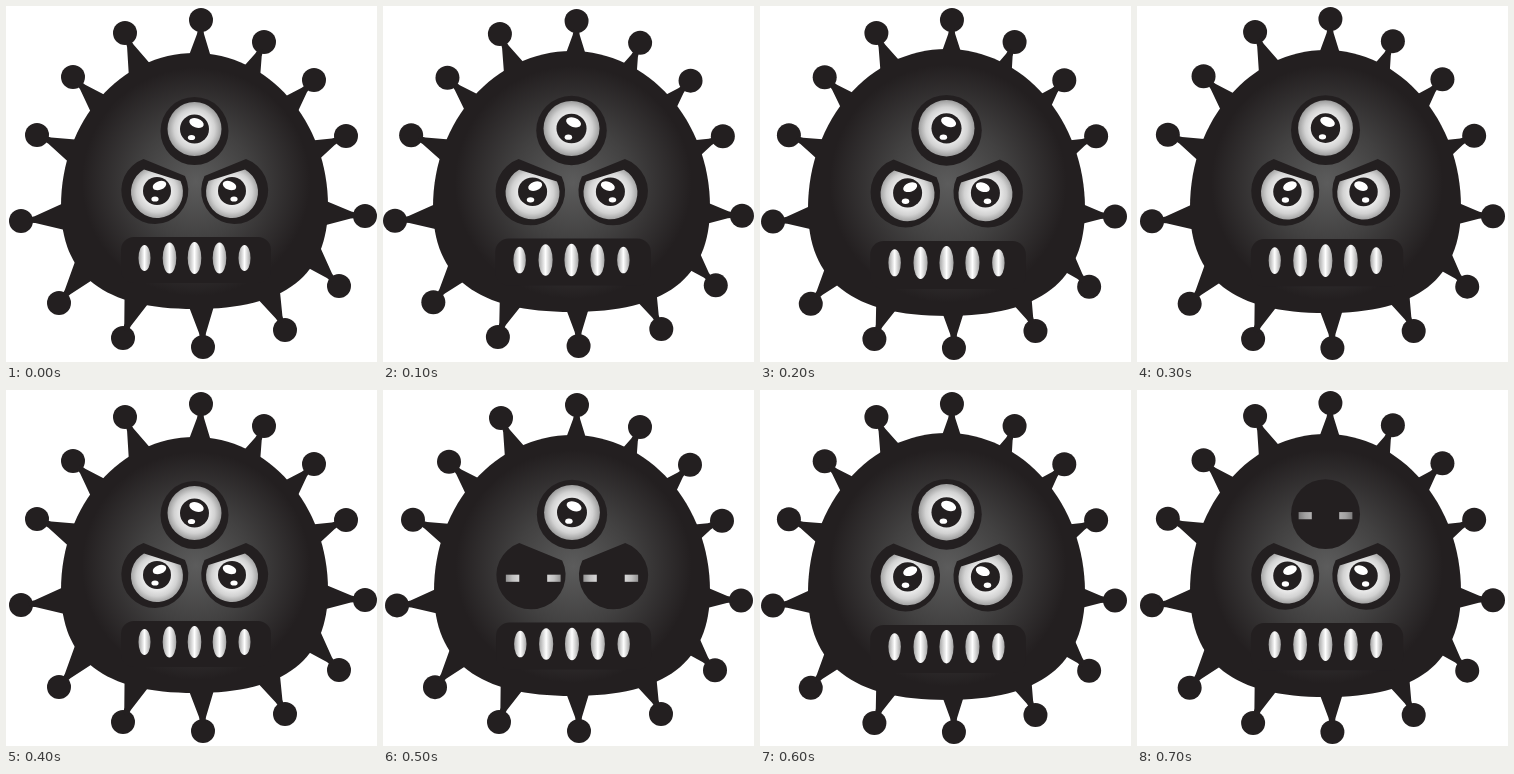
Write an HTML page that moves like this. It is 371x356 px and loops after 800 ms.

```html
<!DOCTYPE html>
<html lang="en">
<head>
<meta charset="utf-8">
<title>Pulsing virus</title>
<style>
  html, body { margin: 0; width: 100%; height: 100%; overflow: hidden; background: #fff; }
  svg { display: block; width: 100%; height: 100%; }
</style>
</head>
<body>
<svg viewBox="0 0 371 356" fill="#231f20">
  <defs>
    <radialGradient id="glow" gradientUnits="userSpaceOnUse" cx="190" cy="176" r="114">
      <stop offset="0" stop-color="#5c5c5c"/>
      <stop offset=".5" stop-color="#424141"/>
      <stop offset="1" stop-color="#231f20"/>
    </radialGradient>
    <radialGradient id="white" gradientUnits="userSpaceOnUse" cx="0" cy="0" r="27">
      <stop offset=".45" stop-color="#f0f0f0"/>
      <stop offset=".75" stop-color="#d2d2d2"/>
      <stop offset="1" stop-color="#9c9c9c"/>
    </radialGradient>
    <linearGradient id="enamel">
      <stop offset="0" stop-color="#a4a4a4"/>
      <stop offset=".5" stop-color="#fff"/>
      <stop offset="1" stop-color="#a4a4a4"/>
    </linearGradient>
    <path id="socket" d="M-12 -33A33.500 33.500 0 1 0 29.500 -16Z"/>
    <g id="eye">
      <path d="M-13 -22.500A26 26 0 1 0 23.500 -11Z" fill="url(#white)"/>
      <circle cy="-1" r="14"/>
      <g fill="#fff">
        <ellipse cx="2.500" cy="-6.500" rx="7" ry="4.300" transform="rotate(-20 2.500 -6.500)"/>
        <ellipse cx="-2" cy="7" rx="3.600" ry="2.600"/>
      </g>
    </g>
    <g id="slit" fill="url(#white)" opacity=".9">
      <rect x="-26.500" y="-2" width="13" height="7"/>
      <rect x="13.500" y="-2" width="13" height="7"/>
    </g>
  </defs>
  <g id="spikes"></g>
  <g id="body">
    <path fill="url(#glow)" d="M55 200C55 115 115 47 188.500 47S322 115 322 200C322 270 279 303 188.500 303S55 270 55 200Z"/>
    <rect x="115" y="231" width="150" height="46" rx="13"/>
    <g id="teeth" fill="url(#enamel)"></g>
    <g transform="translate(151 186)">
      <use href="#socket" x="-1.500"/>
      <use class="low open" href="#eye"/>
      <use class="low shut" href="#slit"/>
    </g>
    <g transform="translate(226 186) scale(-1 1)">
      <use href="#socket" x="-2"/>
      <use class="low open" href="#eye"/>
      <use class="low shut" href="#slit"/>
    </g>
    <g transform="translate(188.500 123)">
      <circle cy="2" r="34"/>
      <g class="top open">
        <circle r="27" fill="url(#white)"/>
        <circle r="14.500"/>
        <g fill="#fff">
          <ellipse cx="2" cy="-6" rx="7.500" ry="4.500" transform="rotate(20 2 -6)"/>
          <ellipse cx="-3" cy="8.500" rx="3.600" ry="2.600"/>
        </g>
      </g>
      <use class="top shut" href="#slit" y="2" opacity=".8"/>
    </g>
  </g>
</svg>
<script>
const $ = id => document.getElementById(id);
const knobs = [
  [195, 14], [258, 36], [308, 74], [340, 130], [359, 210], [333, 280], [279, 324],
  [197, 341], [117, 332], [53, 297], [15, 215], [31, 129], [67, 71], [119, 27]
];

// Left, right, top and bottom extents of the knob ring and of the body
const rest = { ring: [15, 359, 14, 341], body: [55, 322, 47, 303] };
const grow = { ring: [12, 359, 15, 340], body: [50, 327, 45, 306] };
const full = { ring: [13, 355, 14, 342], body: [48, 325, 43, 310] };
const sink = { ring: [15, 356, 13, 342], body: [53, 324, 44, 307] };
const ease = { ring: [14, 358, 15, 341], body: [51, 327, 45, 306] };
const poses = [rest, grow, full, sink, rest, ease, full, sink];

// Scale and offset that carry one box onto another
function fit([l, r, t, b], [L, R, T, B]) {
  const sx = (R - L) / (r - l), sy = (B - T) / (b - t);
  return { sx, sy, dx: L - l * sx, dy: T - t * sy };
}

// Spikes under the flat base lean closer to vertical
function spike(x, y) {
  const a = Math.atan2((y > 250 ? 125 : 198) - y, 189 - x), c = Math.cos(a), s = Math.sin(a);
  const at = (d, w) => (x + c * d - s * w).toFixed(1) + ',' + (y + s * d + c * w).toFixed(1);
  return `<circle cx="${x}" cy="${y}" r="12"/>
    <polygon points="${at(8, 2.5)} ${at(14, 3.5)} ${at(54, 17)} ${at(54, -17)} ${at(14, -3.5)} ${at(8, -2.5)}"/>`;
}

function show(cls, shut) {
  document.querySelectorAll('.' + cls).forEach(e => {
    e.style.display = e.classList.contains('shut') === shut ? '' : 'none';
  });
}

$('teeth').innerHTML = [13, 15.5, 16, 15.5, 13].map((ry, i) =>
  `<ellipse cx="${138.5 + 25 * i}" cy="252" rx="${ry < 14 ? 6 : 6.8}" ry="${ry}"/>`).join('');

let last = -1;
function draw() {
  const step = Math.floor(performance.now() / 100) % 8;
  if (step !== last) {
    last = step;
    const ring = fit(rest.ring, poses[step].ring), body = fit(rest.body, poses[step].body);
    $('spikes').innerHTML = knobs.map(([x, y]) =>
      spike(x * ring.sx + ring.dx, y * ring.sy + ring.dy)).join('');
    $('body').setAttribute('transform', `matrix(${body.sx} 0 0 ${body.sy} ${body.dx} ${body.dy})`);
    show('low', step === 5);
    show('top', step === 7);
  }
  requestAnimationFrame(draw);
}
draw();
</script>
</body>
</html>
```
